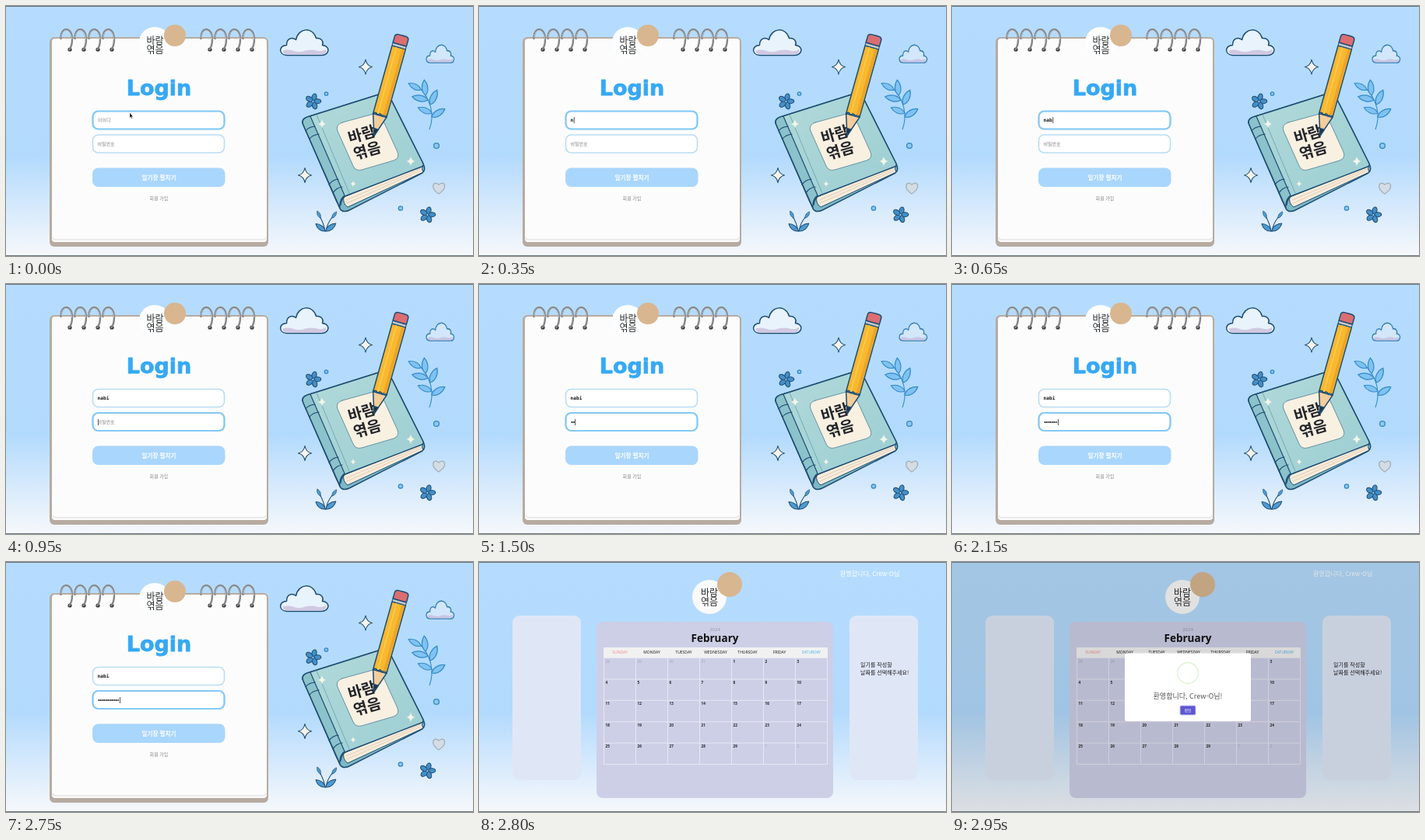
Animation, 600 px wide and 322 px high, one loop 3 s. Source, as an HTML page:

```html
<!DOCTYPE html>
<html lang="ko">
<head>
<meta charset="utf-8">
<title>Diary login</title>
<style>
html, body { margin: 0; width: 100%; height: 100%; overflow: hidden; }
#stage { position: relative; width: 600px; height: 322px; overflow: hidden; }
svg { position: absolute; inset: 0; }
text { font-family: "Noto Sans CJK KR", "Noto Sans CJK", sans-serif; }
.latin { font-family: "Noto Sans", sans-serif; }
.mid { text-anchor: middle; }
.ink { stroke: #1d4d73; stroke-width: 1.5; stroke-linejoin: round; stroke-linecap: round; }
.thin { stroke-width: 1.1; }
.field { fill: #fff; stroke: #b9ddf3; stroke-width: 1.6; }
.focus { fill: none; stroke: #83c9f5; stroke-width: 2.2; }

/* everything shares one 3 s clock */
.a { animation: 3s step-end infinite; }
.login { animation-name: login; }
.home { animation-name: home; }
.mouse, .hint1 { animation-name: before-id; }
.hint2 { animation-name: before-pw; }
.focus1 { animation-name: focus1; }
.focus2 { animation-name: focus2; }
.dim { animation-name: dim; }
.modal { animation-name: modal; transform-box: fill-box; transform-origin: center; }

.type { position: absolute; left: 117.5px; height: 10px; overflow: hidden; width: 0;
  font: bold 6.2px/10px "DejaVu Sans Mono", monospace; color: #1a1a1a; white-space: pre; }
.id { top: 142px; animation: id 3s infinite; }
.pw { top: 172.5px; animation: pw 3s infinite;
  background: radial-gradient(circle at 1.3px 50%, #222 .8px, transparent 1.15px) 0 0 / 2.5px 100%; }
.caret { position: absolute; width: 1px; height: 8px; left: 118px; background: #555; }
.caret1 { top: 143px; animation: caret1 3s infinite; }
.caret2 { top: 173.5px; animation: caret2 3s infinite; }

@keyframes login { 0% { visibility: visible } 93.333%, 100% { visibility: hidden } }
@keyframes home { 0% { visibility: hidden } 93.333%, 100% { visibility: visible } }
@keyframes before-id { 0% { opacity: 1 } 10%, 100% { opacity: 0 } }
@keyframes before-pw { 0% { opacity: 1 } 43.333%, 100% { opacity: 0 } }
@keyframes focus1 { 0% { opacity: 1 } 28.333%, 100% { opacity: 0 } }
@keyframes focus2 { 0% { opacity: 0 } 28.333%, 100% { opacity: 1 } }
@keyframes dim { 0% { opacity: 0 } 96.667% { opacity: .05 } 98.333%, 100% { opacity: .1 } }
@keyframes modal {
  0% { opacity: 0; transform: scale(.7) }
  96.667% { opacity: 1; transform: scale(.85) }
  98.333%, 100% { opacity: 1; transform: none }
}
@keyframes id {
  0% { width: 0; animation-timing-function: step-end }
  10% { width: 0; animation-timing-function: steps(4, start) }
  26%, 100% { width: 15px }
}
@keyframes caret1 {
  0% { opacity: 0; transform: none; animation-timing-function: step-end }
  10% { opacity: 1; transform: none; animation-timing-function: steps(4, start) }
  26% { opacity: 1; transform: translateX(15px); animation-timing-function: step-end }
  28.333%, 100% { opacity: 0; transform: translateX(15px) }
}
@keyframes pw {
  0% { width: 0; animation-timing-function: step-end }
  43.333% { width: 0; animation-timing-function: steps(11, start) }
  91%, 100% { width: 27.5px }
}
@keyframes caret2 {
  0% { opacity: 0; transform: none; animation-timing-function: step-end }
  28.333% { opacity: 1; transform: none; animation-timing-function: step-end }
  43.333% { opacity: 1; transform: none; animation-timing-function: steps(11, start) }
  91%, 100% { opacity: 1; transform: translateX(27.5px) }
}
</style>
</head>
<body>
<div id="stage">
<svg width="600" height="322" viewBox="0 0 600 322">
  <defs>
    <linearGradient id="sky" x2="0" y2="1">
      <stop stop-color="#b5dcfe"/><stop offset=".6" stop-color="#b2dafd"/>
      <stop offset=".8" stop-color="#d5e9fc"/><stop offset="1" stop-color="#f6f8fb"/>
    </linearGradient>
    <linearGradient id="cover" x2="1" y2="1">
      <stop stop-color="#b2d9d9"/><stop offset="1" stop-color="#9bced3"/>
    </linearGradient>
    <path id="star" d="M0-9.500Q1.500-1.500 8.500 0Q1.500 1.500 0 9.500Q-1.500 1.500-8.500 0Q-1.500-1.500 0-9.500Z"/>
    <path id="leaf" d="M0 0C-5-5-4-13 0-18C4-13 5-5 0 0Z"/>
    <path id="cloud" d="M8 33C-3 32-2 20 8 20C8 11 15 9 20 13C23-3 42-4 46 11C53 10 56 16 54 20C65 21 63 33 53 33Z"/>
    <path id="shade" d="M3 27Q10 25 16 27Q24 30 32 27Q41 25 47 27Q54 29 59 25Q59 32 53 32H8Q3 31 3 27Z"/>
    <g id="ring">
      <circle cy="56" r="2.600" fill="#333538"/>
      <path d="M-11.500 42C-12 26 3 26 3 43Q3 51-.500 56" fill="none" stroke="#858789" stroke-width="2.400" stroke-linecap="round"/>
      <path d="M-11 41C-11 28 2 28 2.500 43" fill="none" stroke="#c2c4c6" stroke-width=".9"/>
    </g>
    <g id="flower" class="ink thin"></g>
    <g id="title" class="mid" font-size="12" fill="#2a2a2a"><text>바람</text><text y="12">엮음</text></g>
  </defs>

  <rect width="600" height="322" fill="url(#sky)"/>

  <g class="a login">
    <rect x="56" y="40" width="281" height="270" rx="6" fill="#b7aba1"/>
    <rect x="59" y="42" width="276" height="262" rx="4" fill="#fcfcfd"/>
    <path d="M60 298Q60 301 64 301H330Q334 301 334 298" fill="none" stroke="#dedbd9"/>
    <g id="rings"></g>
    <circle cx="191" cy="47" r="20" fill="#fdfeff"/>
    <circle cx="217" cy="38" r="14" fill="#d8b68f"/>
    <use href="#title" x="191.500" y="49"/>

    <text class="mid" x="196.500" y="114.500" font-size="27" fill="#36a9f4" stroke="#36a9f4" stroke-width=".8"
      stroke-linejoin="round" style="font-family:'DejaVu Sans',sans-serif;font-weight:bold">Login</text>
    <rect class="field" x="111.500" y="135.500" width="169" height="23" rx="7"/>
    <rect class="field" x="111.500" y="166" width="169" height="23" rx="7"/>
    <rect class="focus a focus1" x="111.500" y="135.500" width="169" height="23" rx="7"/>
    <rect class="focus a focus2" x="111.500" y="166" width="169" height="23" rx="7"/>
    <g font-size="6" fill="#858585">
      <text class="a hint1" x="118" y="149">아이디</text>
      <text class="a hint2" x="117.500" y="179.700">비밀번호</text>
      <text class="mid" x="196.500" y="250">회원 가입</text>
    </g>
    <rect x="111" y="208.500" width="170.500" height="24.500" rx="7.500" fill="#a9d6fc"/>
    <text class="mid" x="196.500" y="223.500" font-size="7.600" font-weight="700" fill="#fff">일기장 펼치기</text>
    <path class="a mouse" d="M159 137.500V144L160.400 142.700L161.400 145L162.300 144.500L161.400 142.400H163.200Z" fill="#111" stroke="#fff" stroke-width=".3"/>

    <!-- sky doodles -->
    <g transform="translate(352.500 30.500)"><use href="#cloud" class="ink" fill="#e9f3fc"/><use href="#shade" fill="#d0c8e2"/></g>
    <g transform="translate(540 50) scale(.58 .7)">
      <use href="#cloud" fill="#d3e7fa" stroke="#357fb5" stroke-width="2.200"/><use href="#shade" fill="#c9c6e4"/>
    </g>
    <g class="ink thin" fill="#f6f3e9"><use href="#star" x="462" y="78.500"/><use href="#star" x="384" y="218"/></g>
    <use href="#flower" x="394.500" y="123"/>
    <use href="#flower" x="541.500" y="269"/>
    <g fill="#8fc8f2" stroke="#3288c2" stroke-width="1.300">
      <circle cx="411.500" cy="113" r="2.200"/><circle cx="553" cy="180" r="3.400"/><circle cx="507" cy="260.500" r="2.700"/>
    </g>
    <path d="M556 242C544 234 549 224 556 230C564 224 568 234 556 242Z" fill="#d4dde5" stroke="#a5b0ba" stroke-width="1.400"/>
    <g fill="#7fc3f2" stroke="#358bc9" stroke-width="1.100">
      <path d="M544 159C551 140 546 120 530 104" fill="none"/>
      <use href="#leaf" transform="translate(533 108) rotate(-62)"/>
      <use href="#leaf" transform="translate(539 115) rotate(-5) scale(1.1)"/>
      <use href="#leaf" transform="translate(542 121) rotate(-78) scale(1.15)"/>
      <use href="#leaf" transform="translate(545 127) rotate(25) scale(1.15)"/>
      <use href="#leaf" transform="translate(547 138) rotate(-68) scale(1.05)"/>
      <use href="#leaf" transform="translate(547 143) rotate(58) scale(1.1)"/>
    </g>
    <g class="ink thin" fill="#4e9bd2">
      <path d="M410 290Q408 279 403 271M411 290Q413 279 420 271" fill="none"/>
      <use href="#leaf" transform="translate(404 273) rotate(-25) scale(.55)"/>
      <use href="#leaf" transform="translate(419 273) rotate(35) scale(.55)"/>
      <use href="#leaf" transform="translate(410 290) rotate(-52) scale(.85)"/>
      <use href="#leaf" transform="translate(411 290) rotate(52) scale(.9)"/>
    </g>

    <!-- book -->
    <g class="ink">
      <path d="M381 151Q380 145 387 143L482 113Q489 111 493 117L536 203Q540 211 535 215L441 263Q433 267 429 261Z" fill="#7cb8c6"/>
      <path d="M434 246L536 205Q533 210 536 214L439 259Q432 254 434 246Z" fill="#f7ecda" stroke-width="1"/>
      <path d="M437 250L533 209.500M438 254L533 212" stroke="#d2b7a0" stroke-width=".6"/>
      <path d="M387 143L482 113Q489 111 493 117L536 203Q537 206 534 207L438 244Q431 246 430 256Q427 256 425 252L382 153Q379 146 387 143Z" fill="url(#cover)"/>
      <path d="M387 143Q379 146 382 153L429 260Q428 249 435 244L391 142Z" fill="#8bc2cb" stroke-width="1.200"/>
      <path d="M385 161Q388 156 397 155M390 171Q394 166 402 165M415 230Q419 224 427 223M420 241Q424 234 432 233" fill="none" stroke-width="1.200"/>
      <path d="M399 140L441 241" fill="none" stroke="#699fae" stroke-width=".8"/>
      <path d="M432 150L472 139Q480 137 483 144L503 188Q506 196 498 199L457 211Q449 213 446 206L426 161Q423 153 432 150Z" fill="#f8f0e1" stroke="#588b9c" stroke-width=".9"/>
    </g>
    <g fill="#f3f5e9"><use href="#star" transform="translate(406 152) scale(.6)"/>
      <use href="#star" transform="translate(520 200) scale(.65)"/><use href="#star" transform="translate(446 229) scale(.4)"/></g>
    <g class="mid" font-size="19.500" font-weight="700" fill="#24252a" transform="translate(459 172) rotate(-16)">
      <text>바람</text><text x="1" y="22">엮음</text>
    </g>

    <!-- pencil -->
    <g class="ink" transform="translate(473 167) rotate(15.600)">
      <path d="M0 0L-9-27H9Z" fill="#f3cd9b"/>
      <path d="M0 0L-3-9H3Z" fill="#25303a"/>
      <path d="M-9-27V-118H9V-27Q6-31 3-27Q0-31-3-27Q-6-31-9-27Z" fill="#f9b92f"/>
      <path d="M4-29V-117H8V-29Z" fill="#eca52a" stroke="none"/>
      <path d="M-3-29V-117" stroke="#fccb58" stroke-width="1.500"/>
      <path d="M-9-118V-122H9V-118Z" fill="#c3c8cc" stroke-width="1"/>
      <path d="M-9-122V-130Q-9-134-4-134H4Q9-134 9-130V-122Z" fill="#dc6d70"/>
    </g>
  </g>

  <g class="a home">
    <g fill="#dfe7f7"><rect x="43" y="69" width="88" height="212" rx="9"/><rect x="476" y="69" width="88" height="212" rx="9"/></g>
    <rect x="151" y="77" width="304" height="227" rx="8" fill="#cdcfe7"/>
    <circle cx="296" cy="45" r="22" fill="#fafafa"/>
    <circle cx="322" cy="29" r="16" fill="#d8b68f"/>
    <use href="#title" x="296" y="43.500"/>
    <text x="464" y="18" font-size="8" fill="#fff">환영합니다, Crew-O님</text>
    <g font-size="7" font-weight="500" fill="#1c1c1c"><text x="490" y="134.500">일기를 작성할</text><text x="490" y="145">날짜를 선택해주세요!</text></g>
    <text class="mid latin" x="303" y="89" font-size="6" fill="#9798ab">2024</text>
    <text class="mid latin" x="303" y="103" font-size="13.500" font-weight="600" fill="#111">February</text>
    <rect x="160" y="110" width="288" height="13" fill="#f1f1f2"/>
    <g id="calendar" class="latin"></g>
    <rect class="a dim" width="600" height="322"/>
    <g class="a modal">
      <rect x="222" y="117.500" width="162" height="87.500" rx="2" fill="#fff"/>
      <circle cx="303" cy="143" r="13.300" fill="none" stroke="#e0f3d5" stroke-width="1.400"/>
      <text class="mid" x="303" y="176" font-size="9" font-weight="500" fill="#545454">환영합니다, Crew-O님!</text>
      <rect x="292.500" y="184.500" width="21" height="13" rx="2" fill="#c9c5f1"/>
      <rect x="293.500" y="185.500" width="19" height="11" rx="1.300" fill="#5e55d3"/>
      <text class="mid" x="303" y="193" font-size="5" font-weight="500" fill="#fff">확인</text>
    </g>
  </g>
  <path d="M0 .5H600M0 321.500H600" stroke="#66747f"/>
</svg>
<div class="a login">
  <div class="type id">nabi</div>
  <div class="type pw"></div>
  <div class="caret caret1"></div>
  <div class="caret caret2"></div>
</div>
</div>
<script>
const NS = 'http://www.w3.org/2000/svg';
function add(parent, tag, attrs, text = '') {
  const el = document.createElementNS(NS, tag);
  for (const key in attrs) el.setAttribute(key, attrs[key]);
  el.textContent = text;
  return document.getElementById(parent).appendChild(el);
}

for (const start of [82, 262])
  for (let i = 0; i < 4; i++) add('rings', 'use', { href: '#ring', x: start + i * 18 });

for (let i = 0; i < 5; i++)
  add('flower', 'ellipse', { cy: -5.6, rx: 3, ry: 4.6, fill: '#448fc8', transform: `rotate(${i * 72 + 15})` });
add('flower', 'circle', { r: 1.6, fill: '#a9d2ee', 'stroke-width': .8 });

const days = ['SUNDAY', 'MONDAY', 'TUESDAY', 'WEDNESDAY', 'THURSDAY', 'FRIDAY', 'SATURDAY'];
const left = 160.5, top0 = 123.5, colW = 41, rowH = 27.4;
days.forEach((day, i) => add('calendar', 'text', {
  x: left + (i + .5) * colW, y: 118, class: 'mid latin', 'font-size': 5,
  fill: i === 0 ? '#f08b88' : i === 6 ? '#53b4e6' : '#222'
}, day));

let grid = '';
for (let c = 0; c < 8; c++) grid += `M${left + c * colW} ${top0}V${top0 + 5 * rowH}`;
for (let r = 0; r < 6; r++) grid += `M${left} ${top0 + r * rowH}H${left + 7 * colW}`;
add('calendar', 'path', { d: grid, stroke: '#eeeef5', 'stroke-width': .8 });

for (let n = 0; n < 35; n++) {
  const day = n - 3, inside = day > 0 && day < 30;
  add('calendar', 'text', {
    x: left + n % 7 * colW + 2, y: top0 + Math.floor(n / 7) * rowH + 6, class: 'latin',
    'font-size': 4.6, 'font-weight': inside ? 600 : 400, fill: inside ? '#222' : '#a3a5b8'
  }, inside ? day : day < 1 ? day + 31 : day - 29);
}
</script>
</body>
</html>
```
